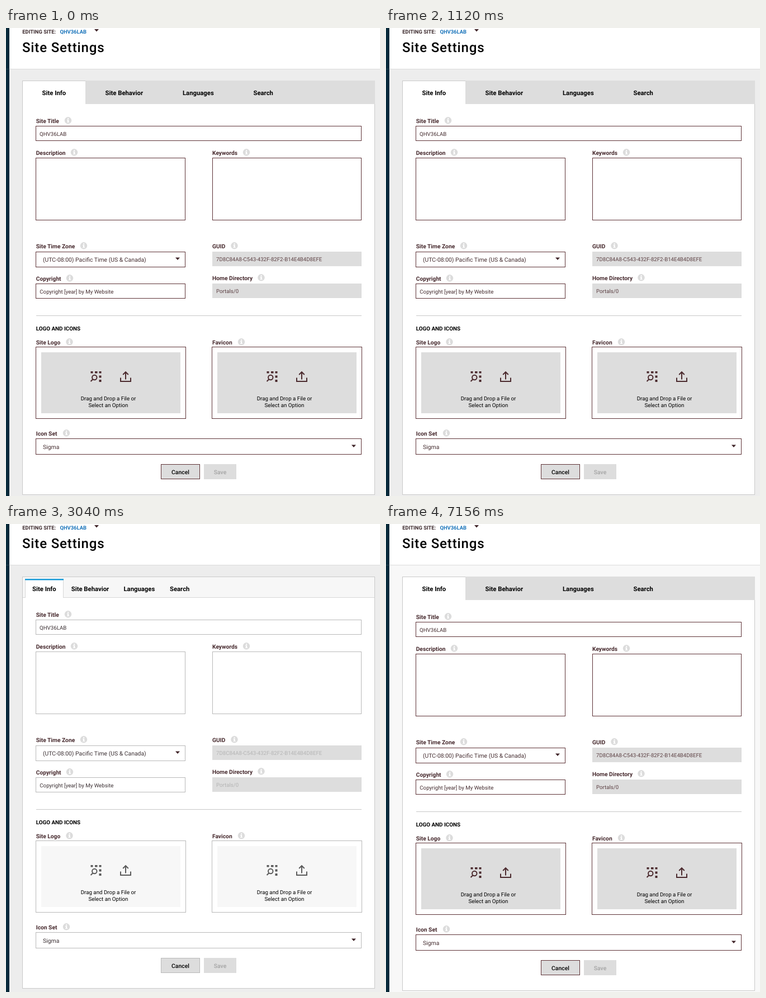
An HTML page for the animation above (8000 ms loop, 669 by 837 pixels).

```html
<!DOCTYPE html>
<html lang="en">
<head>
<meta charset="utf-8">
<title>Site Settings</title>
<style>
  html, body { margin: 0; width: 100%; height: 100%; overflow: hidden; background: #fff; }
  svg {
    display: block; width: 669px; height: 837px;
    font-family: Roboto, sans-serif; text-rendering: geometricPrecision;
    --page: #ededed; --line: #5e3337; --ink: #46292d; --value: #452d30;
    --locked: #5c4043; --zone: #ddd; --glyph: #4b2a2e;
  }
  svg.plain {
    --line: #b9b9b9; --value: #3c3134; --locked: #b4b4b4; --zone: #f7f7f7; --glyph: #5b5b5b;
  }
  svg.light { --page: #f8f8f8; }
  .page { fill: var(--page); }
  .field { fill: #fff; stroke: var(--line); }
  .off { fill: #ddd; }
  .zone { fill: var(--zone); }
  .label { font-size: 10.25px; font-weight: 700; fill: var(--ink); }
  .value { font-size: 9.7px; fill: var(--value); }
  .choice { font-size: 10.4px; fill: var(--value); }
  .locked { font-size: 9.65px; fill: var(--locked); }
  .tab { font-size: 11.3px; font-weight: 700; fill: #000; }
  .head { font-size: 9.85px; font-weight: 700; fill: #000; }
  .hint { font-size: 9.75px; fill: #000; text-anchor: middle; }
  .button { font-size: 10.4px; font-weight: 500; text-anchor: middle; }
  .caret { fill: #402529; }
  .glyph { fill: none; stroke: var(--glyph); stroke-width: 2; }
  .dots { fill: var(--glyph); }
  .plainTabs, .plain .boldTabs { display: none; }
  .plain .plainTabs { display: inline; }
  .plain #form { transform: translateY(-4px); }
</style>
</head>
<body>
<svg id="stage" viewBox="0 0 669 837"></svg>
<script>
const SITE = 'QHV36LAB';
const LOOP = 8000;

const text = (cls, x, y, s, extra = '') =>
  `<text class="${cls}" x="${x}" y="${y}" ${extra}>${s.replace(/&/g, '&amp;')}</text>`;
const rect = (x, y, w, h, attrs) =>
  `<rect x="${x}" y="${y}" width="${w}" height="${h}" ${attrs}/>`;
const field = (x, y, w, h) => rect(x + .5, y + .5, w - 1, h - 1, 'class="field"');
const locked = (y, h, s) =>
  rect(369, y, 267, h, 'class="off"') + text('locked', 376, y + 17, s);
const caret = (x, y) => `<path class="caret" d="M${x - 4} ${y - 2}h8l-4 4.5z"/>`;

const info = (x, y) => `<g transform="translate(${x} ${y})">
  <circle r="6.2" fill="#dcdcdc"/>
  <path fill="#fff" d="M-1-4h2.2v1.9h-2.2zM-1.9-1.2h3.1v3.8h1v1.2h-4.2v-1.2h1v-2.6h-.9z"/></g>`;
const label = (x, y, s, iconX) => text('label', x, y, s) + info(iconX, y - 4.7);

const dropZone = x => `<g transform="translate(${x} 570)">
  ${field(0, 0, 269, 129)}
  ${rect(10, 10, 249, 109, 'class="zone"')}
  <path class="dots" d="M98.5 44h4v3.6h-4zM106 44h4.5v3.6h-4.5zM113.5 44h4v3.6h-4zM113.5 51.5h4v4h-4zM113.5 59h4v4h-4z"/>
  <circle class="glyph" cx="105.3" cy="55" r="4.2" stroke-width="1.6"/>
  <path class="glyph" d="M102.3 58.2L98.6 62"/>
  <path class="glyph" d="M152 55.5V62h18v-6.5M161 58.5V45M156.2 50l4.8-4.8 4.8 4.8"/>
  ${text('hint', 130, 96, 'Drag and Drop a File or')}
  ${text('hint', 130, 108, 'Select an Option')}</g>`;

const tabNames = ['Site Info', 'Site Behavior', 'Languages', 'Search'];
const tabs = xs => tabNames.map((s, i) => text('tab', xs[i], 119.5, s)).join('');

const stage = document.getElementById('stage');
stage.innerHTML = `
  ${rect(0, 0, 669, 837, 'fill="#fff"')}
  ${rect(6, 73, 663, 764, 'class="page"')}
  ${rect(6, 73, 663, 1, 'fill="#dcdcdc"')}
  ${rect(0, 0, 6, 837, 'fill="#062a3a"')}
  ${rect(0, 73, 6, 1, 'fill="#24424f"')}
  ${text('', 29.3, 10, 'EDITING SITE:', 'font-size="9.4" font-weight="700" fill="#3c2a2d"')}
  ${text('', 96.5, 10, SITE, 'font-size="9.4" font-weight="700" fill="#1b75bb"')}
  ${caret(162, 4)}
  ${text('', 29, 43, 'Site Settings', 'font-size="24" font-weight="500" letter-spacing=".85"')}

  <g class="boldTabs">
    ${rect(29.5, 94.5, 630, 740, 'fill="#fff" stroke="#c9c9c9"')}
    ${rect(142, 94, 518, 42, 'fill="#ddd"')}
    ${tabs([64.5, 177.5, 316, 442.5])}
  </g>
  <g class="plainTabs">
    ${rect(29.5, 94.5, 630, 736, 'fill="#fff" stroke="#c9c9c9"')}
    ${rect(30, 95, 629, 36, 'fill="#f7f7f7"')}
    ${rect(30, 131, 629, 1, 'fill="#d8d8d8"')}
    ${rect(34, 98, 69, 34, 'fill="#d8d8d8"')}
    ${rect(35, 98, 67, 34, 'fill="#fff"')}
    ${rect(34, 98, 69, 2.5, 'fill="#1a9bd7"')}
    ${tabs([47, 116.7, 210.5, 293])}
  </g>

  <g id="form">
    ${label(53.7, 170, 'Site Title', 111)}
    ${field(53, 175, 583, 27)}
    ${text('value', 60, 192.5, SITE)}

    ${label(53.7, 227, 'Description', 122)}
    ${field(53, 232, 268, 112)}
    ${label(369, 227, 'Keywords', 430)}
    ${field(369, 232, 267, 112)}

    ${label(53.7, 394, 'Site Time Zone', 139)}
    ${field(53, 400, 268, 28)}
    ${text('choice', 66, 418, '(UTC-08:00) Pacific Time (US & Canada)')}
    ${caret(307, 412.5)}
    ${label(369, 394, 'GUID', 408.5)}
    ${locked(400, 26, '7D8C84A8-C543-432F-82F2-B14E4B4D8EFE')}

    ${label(53.7, 452, 'Copyright', 114)}
    ${field(53, 457, 268, 27)}
    ${text('value', 60.3, 474.5, 'Copyright [year] by My Website')}
    ${label(369, 451, 'Home Directory', 456.5)}
    ${locked(457, 26, 'Portals/0')}

    ${rect(54, 514, 582, 1, 'fill="#c8c8c8"')}
    ${text('head', 53.7, 541, 'LOGO AND ICONS')}
    ${label(53.7, 566, 'Site Logo', 113.5)}
    ${label(369, 566, 'Favicon', 421)}
    ${dropZone(53)}
    ${dropZone(368)}

    ${label(53.7, 729, 'Icon Set', 108)}
    ${field(53, 734, 583, 29)}
    ${text('choice', 66, 753, 'Sigma')}
    ${caret(622, 747.5)}

    ${rect(277.5, 780.5, 69, 26, 'fill="#ddd" stroke="var(--line)"')}
    ${text('button', 312, 797.7, 'Cancel', 'fill="#000"')}
    ${rect(354, 780, 58, 27, 'class="off"')}
    ${text('button', 383, 797.7, 'Save', 'fill="#a3a3a3"')}
  </g>

  <path id="cursor" d="M.5.5V12.8l2.8-2.6 2 4.5 2-.9-2-4.4h3.8z" fill="#fff" stroke="#111" stroke-width=".9"/>`;

const cursor = document.getElementById('cursor');
const steps = [
  { at: 0 },
  { at: 1000, pointer: [493, 830] },
  { at: 1060, pointer: [91, 767] },
  { at: 1120 },
  { at: 3040, theme: 'plain' },
  { at: 5890, theme: 'light' }
];

function draw() {
  const t = performance.now() % LOOP;
  const { theme = '', pointer } = steps.findLast(s => s.at <= t);
  stage.setAttribute('class', theme);
  cursor.setAttribute('visibility', pointer ? 'visible' : 'hidden');
  if (pointer) cursor.setAttribute('transform', `translate(${pointer})`);
  requestAnimationFrame(draw);
}
draw();
</script>
</body>
</html>
```
